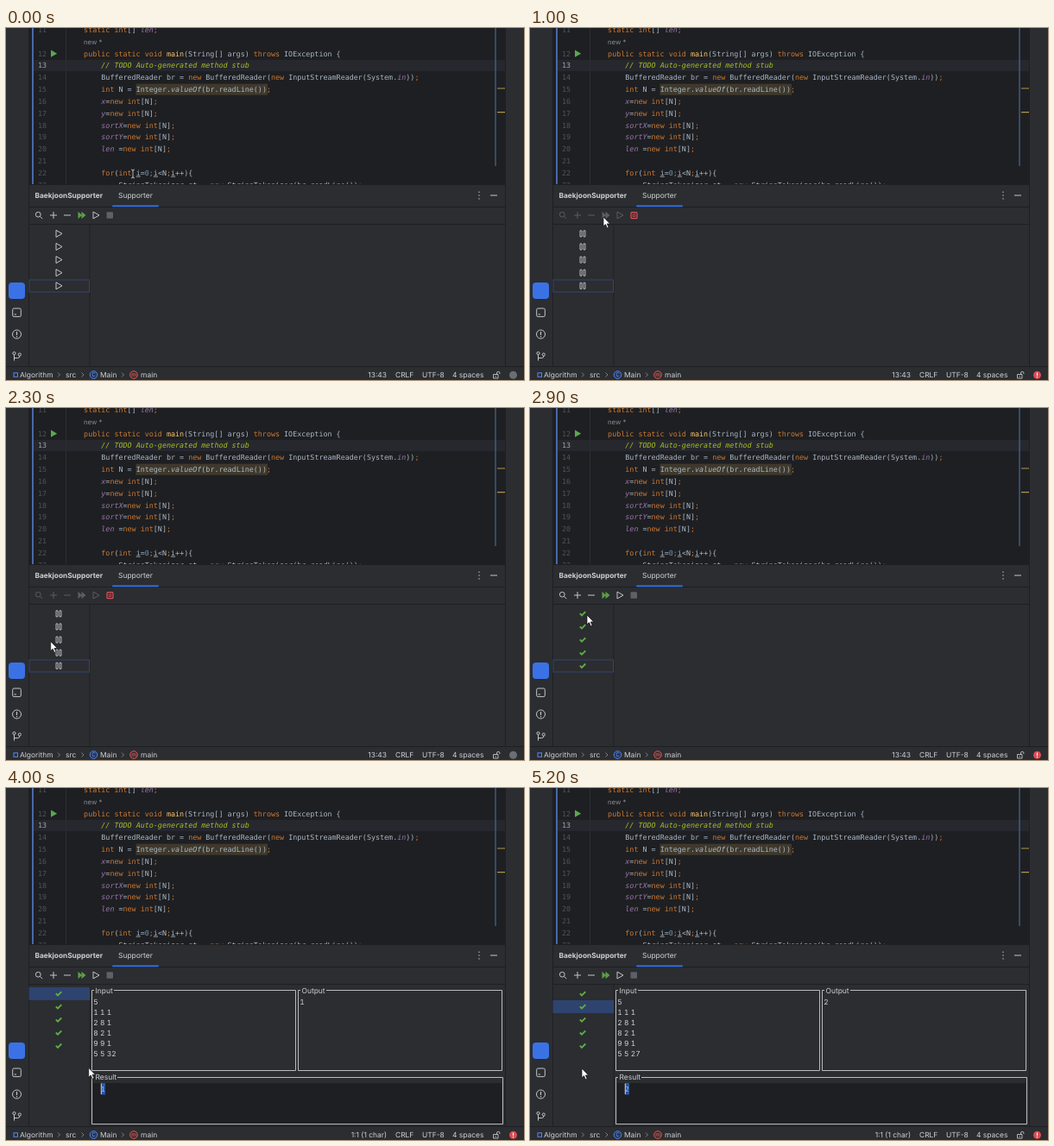
These frames come from a looping animation (600 px wide and 408 px high, 5300 ms). An HTML page:

```html
<!DOCTYPE html>
<html lang="en">
<head>
<meta charset="utf-8">
<title>Test runner panel</title>
<style>
html, body { margin: 0; width: 100%; height: 100%; overflow: hidden; background: #2b2d30; }
svg { display: block; width: 600px; height: 408px; }
text { white-space: pre; text-rendering: geometricPrecision; fill: #ced0d6; font: 8.45px Inter, sans-serif; }
.code text { font: 8.39px "DejaVu Sans Mono", monospace; fill: #a9b7c6; }
.code .num { fill: #4f535a; text-anchor: end; }
.kw { fill: #cc7832; }
.field { fill: #9876aa; font-style: italic; }
.lit { fill: #6897bb; }
.decl { fill: #ffc66d; }
.todo { fill: #a8c023; font-style: italic; }
.static { font-style: italic; }
.re { text-decoration: underline; }
.line { fill: none; stroke: #c3c5ca; }
.busy .tool { stroke: #5a5d63; }
.busy .fast { fill: #5a5d63; }
.fast { fill: #5c9e47; }
.check { fill: none; stroke: #5fae43; stroke-width: 1.9; }
.box { fill: none; stroke: #b9babc; }
.cells, .cells text { font-variant-numeric: tabular-nums; }
</style>
</head>
<body>
<svg viewBox="0 0 600 408">
  <defs><clipPath id="editorClip"><rect x="26" width="552" height="181"/></clipPath></defs>

  <g class="code" clip-path="url(#editorClip)">
    <rect x="26" width="552" height="181" fill="#1e1f22"/>
    <rect x="32" y="37" width="546" height="13" fill="#26282e"/>
    <rect x="30" width="2" height="181" fill="#4a68a8"/>
    <path d="M69.5 0V181" stroke="#2c2e32"/>
    <path d="M567 0V160" stroke="#4a78ad"/>
    <path d="M569 70h9M569 97.700h9" stroke="#b3954a" stroke-width="1.2"/>
    <rect x="150.500" y="64.700" width="152.500" height="13" fill="#3f392c"/>
    <path d="M52 25.600L59.200 29.700 52 33.800z" fill="#5aa84f"/>
    <g id="code"></g>
  </g>
  <text x="90" y="18.700" style="font-size:7.8px;fill:#868a91">new *</text>

  <path d="M26 181.500H578M26 207.500H578M26 227.500H578M0 392.500H600M26.500 0V392M578.500 0V392" stroke="#1e1f22"/>
  <text x="33.500" y="196.800" style="font-weight:700;font-size:8.3px">BaekjoonSupporter</text>
  <text x="130" y="196.800">Supporter</text>
  <rect x="123" y="205.400" width="54" height="1.800" rx=".9" fill="#3574f0"/>
  <path class="line" d="M561 194H569M548 189.500v1.500M548 193.300v1.500M548 197.100v1.500"/>

  <g id="toolbar">
    <g class="line tool">
      <circle cx="37.300" cy="216.200" r="2.900"/>
      <path d="M39.500 218.400l2.700 2.700M51 217H59M55 213V221M67 217H75M101 213V221L108 217z"/>
    </g>
    <path class="fast" d="M83.500 212.800L88 217 83.500 221.200zM87.500 212.800L92.500 217 87.500 221.200z"/>
    <rect id="stopIdle" x="116.500" y="213.300" width="7.500" height="7.500" rx="1" fill="#5d6066"/>
    <g id="stopActive" fill="none" stroke="#e0505a">
      <rect x="117" y="213.700" width="7" height="7" rx="1" stroke-width="1.200"/>
      <rect x="119.200" y="215.900" width="2.600" height="2.600" stroke-width=".8"/>
    </g>
  </g>

  <path d="M97 228V392" stroke="#222326"/>
  <rect id="focusRow" x="27" y="292" width="69.500" height="14" fill="none" stroke="#33446f"/>
  <rect id="pickedRow" x="26.500" width="70.500" height="15" fill="#2e436e"/>
  <g id="rows"></g>

  <g id="details">
    <rect x="101" y="342" width="473" height="47" fill="#1e1f22"/>
    <path class="box" d="M102 234.500H99.500V327.500H335.500V234.500H125"/>
    <path class="box" d="M341 234.500H338.500V327.500H574.500V234.500H371"/>
    <path class="box" d="M102 335.500H99.500V389.500H575.500V335.500H129"/>
    <text x="103.500" y="237.600">Input</text>
    <text x="342.500" y="237.600">Output</text>
    <text x="103.500" y="338.300">Result</text>
    <g id="input" class="cells"></g>
    <text id="output" x="340.300" y="250.700" class="cells"></text>
    <g id="selection">
      <rect x="110" y="342" width="5" height="13.500" fill="#2856a8"/>
      <path d="M110.300 342.500V355" stroke="#ced0d6"/>
    </g>
    <g class="code"><text id="result" x="109.700" y="352"></text></g>
  </g>

  <rect x="3" y="295" width="19" height="19" rx="4" fill="#3a72e6"/>
  <g class="line">
    <rect x="7.700" y="325" width="9.600" height="9.600" rx="1.500"/>
    <path d="M9.500 332H12"/>
    <circle cx="12.500" cy="355" r="5"/>
    <path d="M12.500 352V356M12.500 357V358.200" stroke-width="1.200"/>
    <circle cx="9.500" cy="377" r="1.600"/><circle cx="15.800" cy="378.500" r="1.600"/>
    <path d="M9.500 378.600V385.500M9.500 382.500H13.500Q15.800 382.500 15.800 380.200"/>
  </g>

  <rect x="9" y="399.800" width="4.500" height="4.500" fill="none" stroke="#548af7"/>
  <text x="16" y="405">Algorithm</text>
  <text x="69" y="405">src</text>
  <text x="109" y="405">Main</text>
  <text x="156" y="405">main</text>
  <path d="M60 399.500l2.500 2.500-2.500 2.500M87.500 399.500l2.500 2.500-2.500 2.500M134 399.500l2.500 2.500-2.500 2.500" fill="none" stroke="#85888e" stroke-width=".9"/>
  <circle cx="101.500" cy="402" r="4.300" fill="#25324d" stroke="#548af7"/>
  <text x="101.500" y="404.400" text-anchor="middle" style="font-size:6.500px;fill:#6c9bff">C</text>
  <circle cx="148" cy="402" r="4.300" fill="#402929" stroke="#db5c5c"/>
  <text x="148" y="404" text-anchor="middle" style="font-size:6.500px;fill:#e87878">m</text>
  <text id="caretPos" x="441" y="405" text-anchor="end"></text>
  <text x="451" y="405">CRLF</text>
  <text x="482" y="405">UTF-8</text>
  <text x="517" y="405">4 spaces</text>
  <path class="line" d="M564.500 401.500h5.500v4.500h-5.500zM568.500 401.500v-1.500a1.700 1.700 0 0 1 3.400 0v1M567.200 403v1.500" stroke-width=".9"/>
  <circle id="alert" cx="587.500" cy="402.300" r="4.500"/>
  <path id="alertMark" d="M587.500 399.600V403M587.500 404.100V405.200" stroke="#fff" stroke-width="1.100"/>

  <path id="arrow" d="M0 0V10.800L2.500 8.600 4.300 12.800 6.100 12 4.300 7.900H7.700z" fill="#fff" stroke="#111" stroke-width=".7"/>
  <path id="beam" d="M-2-5Q0-5 0-3.500Q0-5 2-5M0-4V4M-2 5Q0 5 0 3.500Q0 5 2 5" fill="none" stroke="#c4c5c8" stroke-width=".9"/>
</svg>
<script>
const $ = id => document.getElementById(id);
const show = (id, on) => $(id).style.display = on ? '' : 'none';

const LOOP = 5300, STEP = 100;
const RUN = 700, DONE = 2400, PICK1 = 3000, SELECT1 = 3800, PICK2 = 4200, SELECT2 = 4800;
const ROW_Y = [0, 1, 2, 3, 4].map(i => 238.4 + i * 15.1);

// Source lines; {style text} marks a highlighted token.
const code = [
  [11, 0, '{kw static int}[] {field len}{kw ;}'],
  [12, 0, '{kw public static void} {decl main}(String[] args) {kw throws} IOException {'],
  [13, 1, '{todo // TODO Auto-generated method stub}'],
  [14, 1, 'BufferedReader br = {kw new} BufferedReader({kw new} InputStreamReader(System.{field in})){kw ;}'],
  [15, 1, '{kw int} N = Integer.{static valueOf}(br.readLine()){kw ;}'],
  ...['x', 'y', 'sortX', 'sortY', 'len '].map((name, i) =>
    [16 + i, 1, `{field ${name}}={kw new int}[N]{kw ;}`]),
  [21, 1, ''],
  [22, 1, '{kw for}({kw int} {re i}={lit 0}{kw ;}{re i}<N{kw ;}{re i}++){'],
  [23, 2, 'StringTokenizer st = {kw new} StringTokenizer(br.readLine()){kw ;}']
];
const paint = line => line.replace(/</g, '&lt;')
  .replace(/\{(\w+) ([^{}]+)\}/g, '<tspan class="$1">$2</tspan>');
$('code').innerHTML = code.map(([n, indent, line]) => {
  const y = n === 11 ? 4.9 : 32.6 + (n - 12) * 13.82;
  const bright = n === 13 ? ' style="fill:#a1a3ab"' : '';
  return `<text class="num" x="47" y="${y}"${bright}>${n}</text>
    <text x="${90.1 + indent * 20.2}" y="${y}">${paint(line)}</text>`;
}).join('');

const icons = {
  ready: '<path class="line" d="M-3-4V4L4 0z"/>',
  running: '<path class="line" d="M-3-3.500h2v7h-2zM1-3.500h2v7H1z" stroke-width=".9"/>',
  passed: '<path class="check" d="M-3.200-.2L-1 2 3.300-2.300"/>'
};
let rowState;
function setRows(state) {
  if (state === rowState) return;
  rowState = state;
  $('rows').innerHTML = ROW_Y.map(y => `<g transform="translate(61 ${y})">${icons[state]}</g>`).join('');
}

let shownCase;
function setCase(n) {
  if (n === shownCase) return;
  shownCase = n;
  const lines = ['5', '1 1 1', '2 8 1', '8 2 1', '9 9 1', n === 2 ? '5 5 27' : '5 5 32'];
  $('input').innerHTML = lines.map((s, i) => `<text x="101.300" y="${250.7 + i * 12}">${s}</text>`).join('');
  $('output').textContent = $('result').textContent = n || '';
}

// Pointer stops: time, x, y
const stops = [
  [0, 147, 169], [500, 87, 217], [800, 85, 218], [1000, 85, 219], [1800, 48, 278],
  [2400, 52, 270], [2900, 66, 240], [3050, 66, 238], [3400, 216, 271], [3700, 118, 349],
  [3900, 110, 349], [4200, 55, 254], [4400, 55, 254], [4700, 117, 349], [4900, 110, 349], [5200, 60, 325]
];
function pointerAt(t) {
  const i = stops.findIndex(s => s[0] >= t);
  if (i < 1) return stops[i < 0 ? stops.length - 1 : 0].slice(1);
  const [t0, x0, y0] = stops[i - 1], [t1, x1, y1] = stops[i];
  const u = (t - t0) / (t1 - t0), e = u * u * (3 - 2 * u);
  return [x0 + (x1 - x0) * e, y0 + (y1 - y0) * e];
}

function draw(t) {
  const busy = t >= RUN && t < DONE;
  setRows(t < RUN ? 'ready' : busy ? 'running' : 'passed');
  $('toolbar').setAttribute('class', busy ? 'busy' : '');
  show('stopIdle', !busy);
  show('stopActive', busy);

  const picked = t < PICK1 ? 0 : t < PICK2 ? 1 : 2;
  setCase(picked);
  show('details', picked);
  show('pickedRow', picked);
  show('focusRow', !picked);
  $('pickedRow').setAttribute('y', picked === 2 ? 246 : 230.9);
  show('selection', t >= SELECT2 || (t >= SELECT1 && t < PICK2));
  $('caretPos').textContent = t < SELECT1 ? '13:43' : '1:1 (1 char)';

  const alert = (t + 60) % 1133 > 580;
  $('alert').setAttribute('fill', alert ? '#db4c55' : '#6b6e74');
  show('alertMark', alert);

  const [x, y] = pointerAt(t);
  const overText = y < 181 || (picked && x > 98 && y > 229);
  show('beam', overText);
  show('arrow', !overText);
  $(overText ? 'beam' : 'arrow').setAttribute('transform', `translate(${x} ${y})`);
}

function tick() {
  const t = performance.now() % LOOP;
  draw(Math.floor(t / STEP) * STEP);
  requestAnimationFrame(tick);
}
tick();
</script>
</body>
</html>
```
